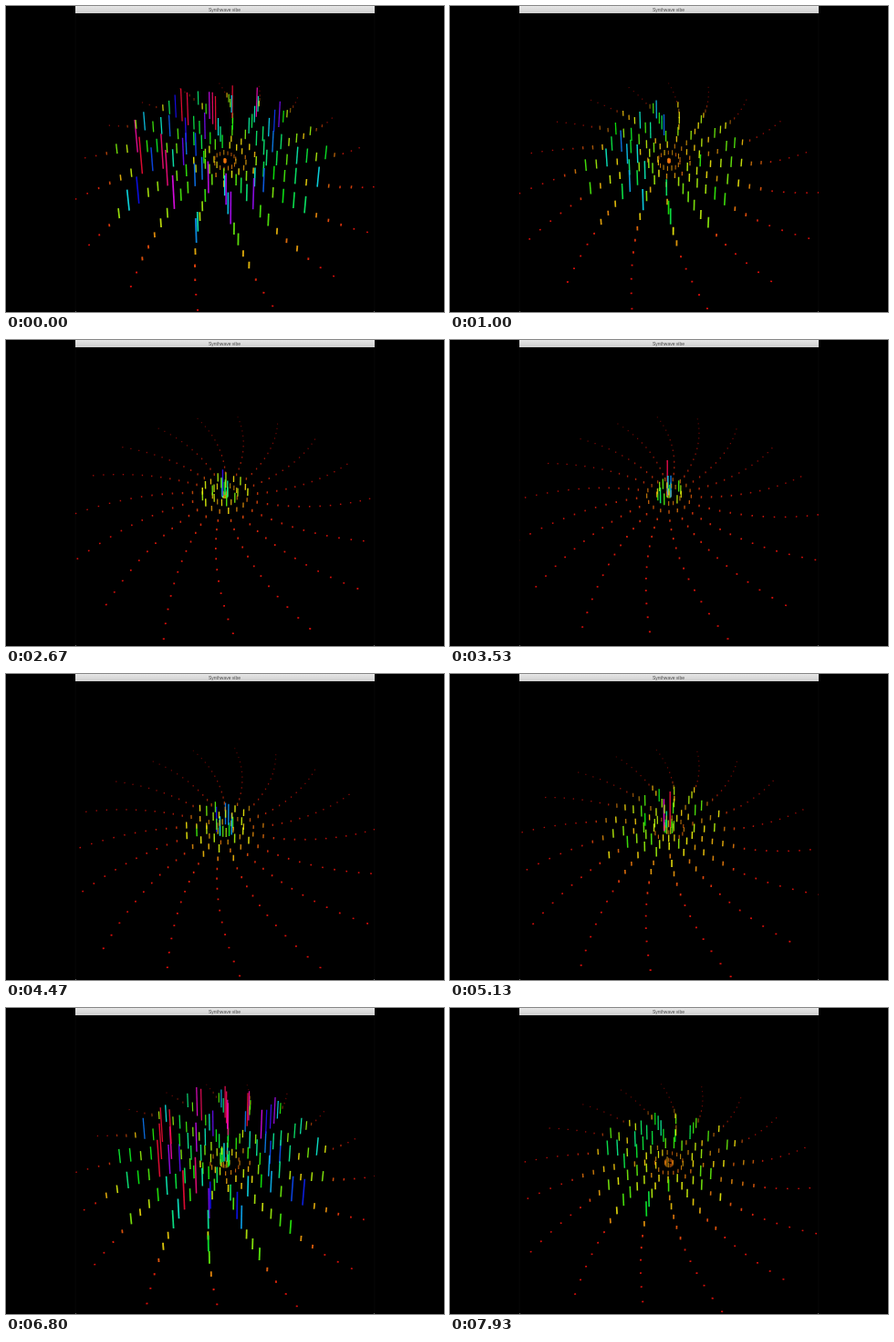
Write an HTML page that moves like this. It is 480x336 px and loops after 8 s.

```html
<!DOCTYPE html>
<html lang="en">
<head>
<meta charset="utf-8">
<title>Synthwave vibe</title>
<style>
  html, body { margin: 0; width: 100%; height: 100%; overflow: hidden; background: #000; }
  svg { display: block; width: 100vw; height: 100vh; }
  text { font: 5px "Liberation Sans", Arial, sans-serif; fill: #484848; text-anchor: middle; }
</style>
</head>
<body>
<svg viewBox="0 0 480 336">
  <defs>
    <linearGradient id="bar" x1="0" y1="0" x2="0" y2="1">
      <stop offset="0" stop-color="#e6e6e6"/>
      <stop offset="1" stop-color="#cfcfcf"/>
    </linearGradient>
    <clipPath id="win"><rect x="76" y="8" width="328" height="328"/></clipPath>
  </defs>
  <rect width="480" height="336" fill="#000"/>
  <path d="M76.2 8V336M403.8 8V336" stroke="#0e0e0e" stroke-width=".5"/>
  <path d="M76 335h1v1h-1zM403 335h1v1h-1z" fill="#666"/>
  <g id="bars" clip-path="url(#win)"></g>
  <rect x="76" width="328" height="8" fill="url(#bar)"/>
  <text x="239.5" y="5.9">Synthwave vibe</text>
</svg>
<script>
const LOOP = 8000, FPS = 15;
const SPOKES = 17, RINGS = 15, GAP = 0.0725, TWIST = 19.13;
const RAD = Math.PI / 180;

// Perspective of the unit disc
const CX = 240, CY = 172, AX = 152, AZ = 111, AY = 106, KZ = 0.306, KY = 0.1;

const group = document.getElementById("bars");
const lines = Array.from({ length: SPOKES * RINGS }, () =>
  group.appendChild(document.createElementNS("http://www.w3.org/2000/svg", "line")));

const clamp = (x, lo, hi) => Math.min(hi, Math.max(lo, x));
const wave = (t, peak, period) => Math.cos(2 * Math.PI * (t - peak) / period);
const bell = (x, power = 2) => Math.exp(-(Math.abs(x) ** power));

function noise(a, b) {
  const v = Math.sin(a * 12.9898 + b * 78.233) * 43758.5453;
  return v - Math.floor(v);
}

// Degrees turned: a steady spin that swings back and forth
const spinAt = t => 8.6 + 8.12 * t + 7 * wave(t, 6.6, 7.6);

// The music swells twice; a tall core sounds in between
function soundAt(t) {
  const swell = 0.5 + 0.5 * wave(t, 0, 6.7);
  return {
    loud: 0.14 + 0.48 * swell ** 4,
    reach: 0.1 + 0.52 * swell,
    core: bell((t - 4.75) / 2.4, 4)
  };
}

function hueAt({ loud, reach, core }, r, angle, rand) {
  const body = loud * bell((r - 0.75 * reach) / (0.42 * reach + 0.03), 3);
  const side = 1 + 0.25 * Math.cos((angle - 205) * RAD);
  const peak = core * 0.95 * bell(r / 0.075, 4) * rand ** 3;
  const base = 0.07 * Math.exp(-r / 0.3);
  return Math.min(0.97, base + body * side * (0.3 + 1.3 * rand ** 1.5) + peak);
}

function project(x, y, z) {
  const depth = 1 - KZ * z - KY * y;
  return [CX + AX * x / depth, CY + (AZ * z - AY * y) / depth];
}

function drawBar(line, r, angle, hue) {
  const x = r * Math.cos(angle * RAD), z = r * Math.sin(angle * RAD);
  const [x1, y1] = project(x, 0, z);
  const [x2, y2] = project(x, 0.012 + 0.36 * hue, z);
  const attrs = {
    x1, y1, x2, y2,
    "stroke-width": 1.45 / (1 - KZ * z) * clamp(0.5 + 2 * r + hue, 0.5, 1),
    stroke: `hsl(${hue * 360} 90% 50%)`,
    opacity: hue < 0.12 ? clamp(0.75 + 0.4 * z, 0.3, 0.9) : 0.9
  };
  for (const name in attrs) line.setAttribute(name, attrs[name]);
}

function render(t) {
  const spin = spinAt(t), sound = soundAt(t);
  const flow = spin / (TWIST * GAP) + 0.467;
  const born = Math.floor(flow);

  for (let i = 0; i < RINGS; i++) {
    const r = (i + flow - born) * GAP;
    for (let s = 0; s < SPOKES; s++) {
      const angle = spin + TWIST * (1 - r) + s * 360 / SPOKES;
      const hue = hueAt(sound, r, angle, noise(born - i, s));
      drawBar(lines[i * SPOKES + s], r, angle, hue);
    }
  }
}

const start = performance.now();
function tick() {
  const ms = (performance.now() - start) % LOOP;
  render(Math.floor((ms + 4) * FPS / 1000) / FPS);
  requestAnimationFrame(tick);
}
tick();
</script>
</body>
</html>
```
